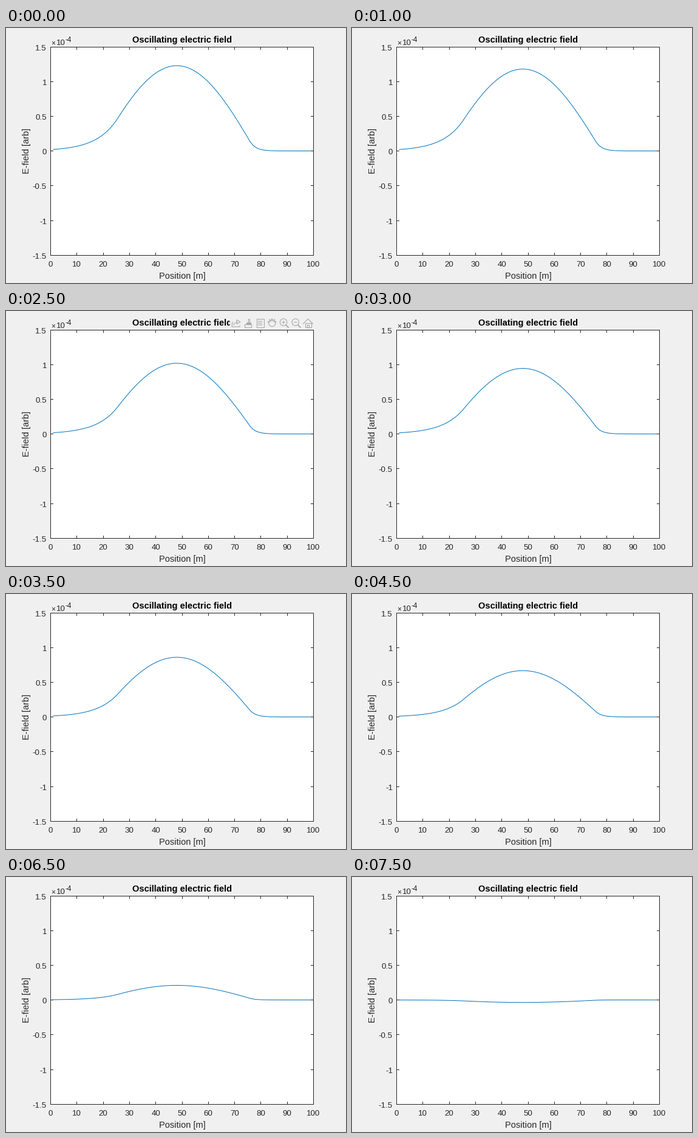
Recreate the animation shown at these times as a matplotlib script. Size 560 px wide and 420 px high, loop 8 s.

```python
import numpy as np
import matplotlib.pyplot as plt
from matplotlib.animation import FuncAnimation
from matplotlib.patches import Circle, Rectangle, RegularPolygon

W, H, DPI = 560, 420, 100
PX = 72 / DPI
INK, GREY, PAPER, BLUE = "#262626", "#a9a9a9", "#f0f0f0", "#0072bd"
LEFT, RIGHT, TOP, BOTTOM = 73.5, 506.5, 31.5, 374.5
ZERO, UNIT = 202.5, 114.2
TICK = 4.5

plt.rcParams["font.family"] = "Liberation Sans"
plt.rcParams["axes.unicode_minus"] = False

fig = plt.figure(figsize=(W / DPI, H / DPI), dpi=DPI, facecolor=PAPER)
ax = fig.add_axes([0, 0, 1, 1])
ax.set_xlim(0, W)
ax.set_ylim(H, 0)
ax.axis("off")


def text(x, y, s, size=13.33, ha="center", **kw):
    return ax.text(x, y, s, fontsize=size * PX, ha=ha, va="baseline",
                   **{"color": INK, **kw})


def stroke(xs, ys, color=INK, width=1.0, z=4):
    return ax.plot(xs, ys, color=color, lw=width * PX, zorder=z, snap=False,
                   solid_capstyle="projecting", solid_joinstyle="miter")[0]


def draw_frame():
    ax.add_patch(Rectangle((LEFT, TOP), RIGHT - LEFT, BOTTOM - TOP,
                           fc="white", ec="none", zorder=1, snap=False))
    for x in (LEFT, RIGHT):
        stroke([x, x], [TOP, BOTTOM])
    for y in (TOP, BOTTOM):
        stroke([LEFT, RIGHT], [y, y])

    for k, x in enumerate(np.linspace(LEFT, RIGHT, 11)):
        px = np.floor(x) + 0.5
        stroke([px, px], [BOTTOM, BOTTOM - TICK + 0.5])
        stroke([px, px], [TOP, TOP + TICK - 0.5])
        text(x, 393, str(10 * k))
    for k, y in enumerate(np.linspace(TOP, BOTTOM, 7)):
        py = np.floor(y - 0.2) + 0.5
        stroke([LEFT, LEFT + TICK - 0.5], [py, py])
        stroke([RIGHT, RIGHT - TICK + 0.5], [py, py])
        text(67, y + 5.3, f"{1.5 - 0.5 * k:g}", ha="right")

    text(74, 28, "×", size=12, ha="left")
    text(83, 28, "10", ha="left")
    text(98, 23, "-4", size=12, ha="left")
    text(290, 24, "Oscillating electric field", size=14.67, color="black",
         weight="bold", zorder=5)
    text(290, 413, "Position [m]", size=14.67)
    text(38, 202, "E-field [arb]", size=14.67, rotation=90,
         rotation_mode="anchor")


def draw_toolbar(y=20):
    """Hover toolbar with seven small grey icons, evenly spaced."""
    parts = [ax.add_patch(Rectangle((369, 11), 139, 18, fc=PAPER, ec="none",
                                    zorder=8))]
    share, brush, tip, hand, plus, minus, home = np.linspace(379, 497.5, 7)

    def line(xs, ys, width=1.1):
        parts.append(stroke(xs, ys, GREY, width, 9))

    def shape(patch, fill=False):
        patch.set(fc=GREY if fill else "none", ec=GREY, lw=1.1 * PX, zorder=9)
        parts.append(ax.add_patch(patch))

    def box(cx, dy, w, h, fill=False):
        shape(Rectangle((cx - w / 2, y + dy), w, h), fill)

    # tray with an arrow curving out of it
    line([share - 6, share - 7, share + 6, share + 6],
         [y - 2, y + 6, y + 6, y + 4])
    s = np.linspace(0, 1, 10)
    line(share - 4 + 6 * s, y + 3 - 5 * np.sqrt(s))
    shape(RegularPolygon((share + 3, y - 2), 3, radius=4,
                         orientation=-np.pi / 2))

    box(brush + 1, -7, 2, 6)
    box(brush + 1, -1, 7, 3, fill=True)
    box(brush, 2, 11, 5)

    box(tip, -7, 12, 14)
    for dy in (-3, 0, 3):
        line([tip - 3, tip + 3], [y + dy, y + dy])

    # palm outline whose upper half ripples into five fingers
    a = np.linspace(0, 2 * np.pi, 120)
    r = 5.5 - 1.8 * np.cos(10 * a) * np.clip(3 * np.sin(a), 0, 1)
    line(hand + r * np.cos(a), y - r * np.sin(a))

    for cx in (plus, minus):
        shape(Circle((cx - 1, y - 1.5), 5.7))
        line([cx + 3.5, cx + 7], [y + 3.5, y + 7], 1.8)
        line([cx - 3, cx + 1], [y - 1.5, y - 1.5])
    line([plus - 1, plus - 1], [y - 3.5, y + 0.5])

    roof = np.linspace(-8, 8, 3)
    line(home + roof, y - 7 + np.abs(roof))
    box(home, 0, 10, 7)
    box(home, 3, 3, 4)
    return parts


def mode(x, a=25.8, b=75.6, x0=48.0, q=0.0524):
    """Guided mode: cosine core with an exponential tail on each side."""
    core = np.cos(q * (np.clip(x, a, b) - x0))
    decay = 0.125 * np.maximum(a - x, 0) + 0.45 * np.maximum(x - b, 0)
    return core * np.exp(-decay)


draw_frame()
toolbar = draw_toolbar()
pos = np.arange(1, 101)
field = 1.236 * mode(pos)
curve = stroke(LEFT + (RIGHT - LEFT) * pos / 100, ZERO - UNIT * field, BLUE, z=3)


def update(i):
    curve.set_ydata(ZERO - UNIT * field * np.cos(0.1 * (i + 1)))
    for part in toolbar:
        part.set_visible(i == 5)
    return [curve, *toolbar]


anim = FuncAnimation(fig, update, frames=16, interval=500, repeat=True,
                     repeat_delay=0, blit=False)
plt.show()
```
